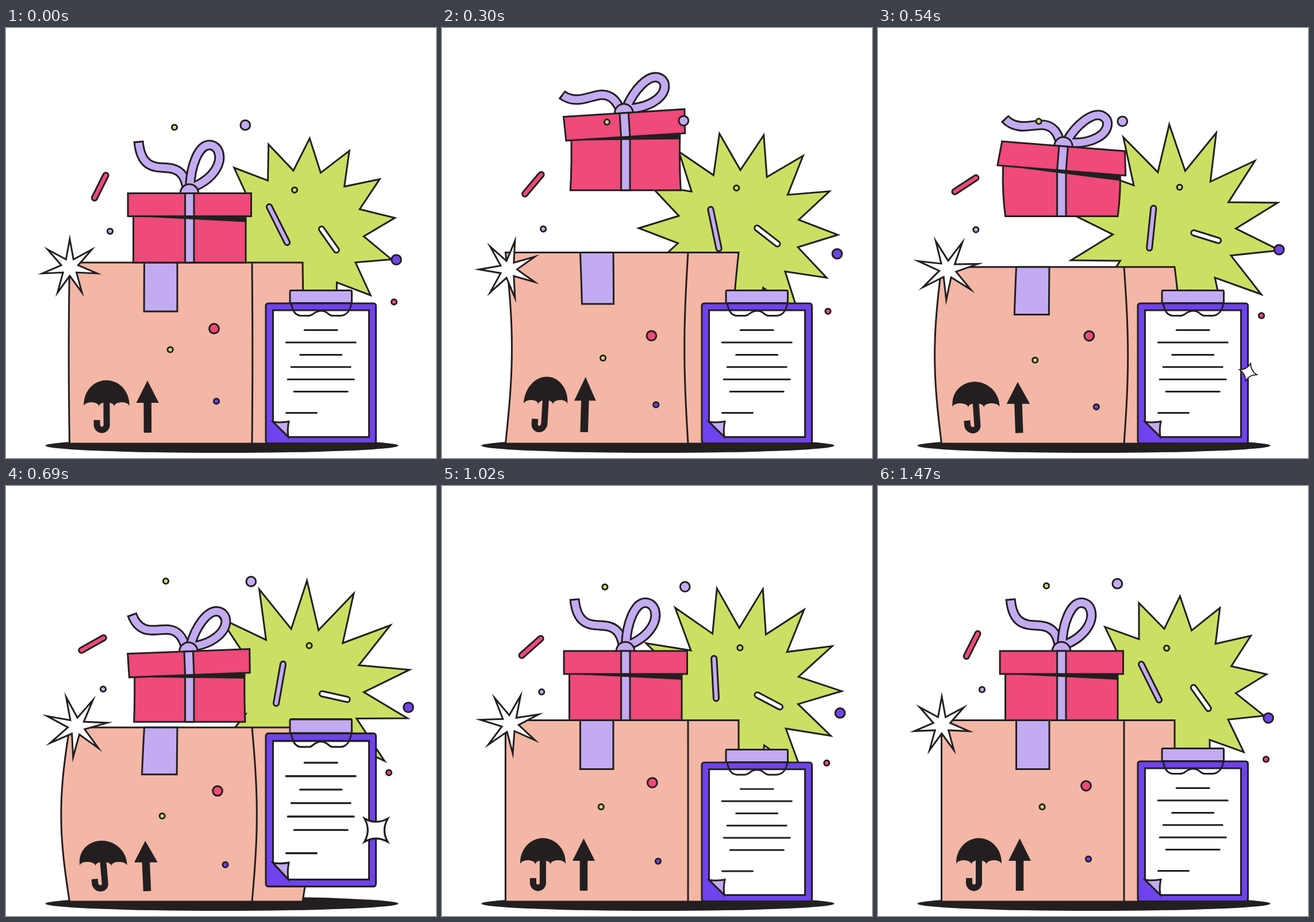
An HTML page with a canvas for the animation above (1500 ms loop, 748 px wide and 748 px high).

```html
<!DOCTYPE html>
<html lang="en">
<head>
<meta charset="utf-8">
<title>Parcel and gift</title>
<style>
  html, body { margin: 0; width: 100%; height: 100%; overflow: hidden; background: #fff; }
  canvas { display: block; width: 100vw; height: 100vh; }
</style>
</head>
<body>
<canvas id="stage" width="748" height="748"></canvas>
<script>
const ctx = document.getElementById('stage').getContext('2d');
const INK = '#231f20', PINK = '#ef4a79', LILAC = '#c3abf2', PEACH = '#f4b7a6';
const LIME = '#cae063', PURPLE = '#6f43ee', WHITE = '#fff';
const LOOP = 1500, TAU = Math.PI * 2, RAD = Math.PI / 180, GRAVITY = .0065;

// Eased swell that peaks at 690 ms and is back at the end of the loop
const pulse = t => (1 - Math.cos(Math.PI * (t < 690 ? t / 690 : (LOOP - t) / 810))) / 2;
const wave = (t, delay) => Math.sin(TAU * (t - delay) / LOOP);
const fall = (t, apex) => GRAVITY * (t - apex) ** 2;

// Damped spring of the box lid; positive is squashed
const boxSink = t => 44 * Math.max(0, 1 - t / 1080) * Math.sin(TAU * t / 510);

function boardScale(t) {
  const u = (t - 540) / 510;
  return u < 0 || u > 1 ? 1 : 1 - .15 * Math.sin(Math.PI * u) * Math.sin(TAU * (t - 540) / 235);
}

function paint(fill, width = 3) {
  if (fill) { ctx.fillStyle = fill; ctx.fill(); }
  if (width) { ctx.lineWidth = width; ctx.strokeStyle = INK; ctx.stroke(); }
}
function poly(points, fill, width, open) {
  ctx.beginPath();
  points.forEach(([x, y]) => ctx.lineTo(x, y));
  if (!open) ctx.closePath();
  paint(fill, width);
}
function box(x, y, w, h, fill, radius = 0) {
  ctx.beginPath();
  ctx.roundRect(x, y, w, h, radius);
  paint(fill);
}
function disc(x, y, r, fill) {
  ctx.beginPath();
  ctx.arc(x, y, r, 0, TAU);
  paint(fill);
}
function star(cx, cy, count, outer, inner, degrees, fill) {
  poly(Array.from({ length: count * 2 }, (_, i) => {
    const a = degrees * RAD + i * Math.PI / count, r = i % 2 ? inner : outer;
    return [cx + r * Math.cos(a), cy + r * Math.sin(a)];
  }), fill);
}
const ring = (x, y, rx, ry, from, to) => Array.from({ length: 25 }, (_, i) => {
  const a = (from + (to - from) * i / 24) * RAD;
  return [x + rx * Math.cos(a), y + ry * Math.sin(a)];
});

// x, y, drift, sway, radius, colour; each dot sways a little later than the one before
const dots = [
  [181, 354, -12, -4.5, 4.6, LILAC],
  [416.3, 168.5, 10, -7.7, 8.4, LILAC],
  [362, 525.3, 6, 11.6, 8.4, PINK],
  [293, 170, -15, -8, 4.6, LIME],
  [285.7, 565.5, -14, 12.5, 4.6, LIME],
  [502, 280, 25.5, -3, 4.6, LIME],
  [675, 486.5, -9, 14, 4.6, PINK],
  [366, 653.7, 15.5, 5.5, 4.6, PURPLE],
  [679, 394.5, 21, -9.7, 8.4, PURPLE]
];
function drawDots(t) {
  dots.forEach(([x, y, drift, sway, r, fill], i) =>
    disc(x + drift * pulse(t), y + sway * wave(t, 35 * i - 20), r, fill));
}

function drawBar(t, x, y, drift, sway, length, angle, turn, fill) {
  ctx.save();
  ctx.translate(x + drift * pulse(t), y + sway * wave(t, 0));
  ctx.rotate((angle + turn * pulse(t)) * RAD);
  box(-length / 2 - 4.6, -4.6, length + 9.2, 9.2, fill, 4.6);
  ctx.restore();
}

function drawBox(t) {
  const sink = boxSink(t), top = 407.5 + sink;
  const bulge = sink > 0 ? .13 * sink / (sink + 10) : .0032 * sink;
  const warp = ([x, y]) => [
    313 + (x - 313) * (1 + bulge * Math.sin(Math.PI * (y - 407.5) / 315.5)),
    723 - (723 - y) * (723 - top) / 315.5
  ];
  const side = (x, y0, y1) => Array.from({ length: 21 }, (_, i) => [x, y0 + (y1 - y0) * i / 20]);
  const panel = (x0, y0, x1, y1, fill) =>
    poly([...side(x0, y1, y0), ...side(x1, y0, y1)].map(warp), fill);

  panel(110.5, 407.5, 516, 723, PEACH);
  poly(side(428, 407.5, 723).map(warp), null, 3, true);
  panel(240.5, 407.5, 298, 492.5, LILAC);

  const scallops = [26.3, 0, -26.3].flatMap(dx => ring(175.5 + dx, 658, 13, 7, 0, -180));
  poly([...ring(175.5, 655, 39.5, 42.5, 180, 360), ...scallops].map(warp), INK, 0);
  poly([[175.5, 650], ...ring(167, 690, 8.5, 9, 0, 180), [158.5, 682]].map(warp), null, 11, true);
  poly([[246.5, 613], [266, 652], [227, 652]].map(warp), INK, 0);
  poly([[246.5, 651], [246.5, 704]].map(warp), null, 13.5, true);
}

// Cubic curves starting at the knot's frame: tail at rest, tail in the wind, loop of the bow
const tailRest = [-88.5, -91, -84, -35, -50, -48, -30, -43, -14, -39, -7, -28, -4, -8];
const tailBlown = [-108, -33, -82, -16, -56, -33, -38, -33, -20, -33, -12, -20, -6, -6];
const bowLoop = [1, -10, 2, -48, 16, -83, 34, -84, 52, -84, 58, -62, 46, -42, 36, -26, 20, -16, 4, -10];

function drawRibbon(c) {
  ctx.beginPath();
  ctx.moveTo(c[0], c[1]);
  for (let i = 2; i < c.length; i += 6) ctx.bezierCurveTo(...c.slice(i, i + 6));
  paint(null, 18);
  ctx.setLineDash([0, 3, 999, 0]);
  ctx.lineWidth = 12;
  ctx.strokeStyle = LILAC;
  ctx.stroke();
  ctx.setLineDash([]);
}
function drawBow(wind) {
  drawRibbon(tailRest.map((v, i) => v + (tailBlown[i] - v) * wind * wind));
  const cos = Math.cos(.4 * wind), sin = Math.sin(.4 * wind), flat = 1 - .12 * wind;
  drawRibbon(bowLoop.map((v, i, c) => i % 2
    ? (v * cos + c[i - 1] * sin) * flat
    : v * cos - c[i + 1] * sin));
  disc(0, 0, 15.8, LILAC);
}

function drawGift(t) {
  // Two hops, each a free flight above the springing box
  const [apex, top] = t < 640 ? [406.5, 210] : [790, 346.5];
  const ground = 407.5 + boxSink(t);
  const base = Math.min(ground, top + fall(t, apex));
  const gap = ground - base, flight = gap / (gap + 6);
  const tilt = .036 * (t - apex) * flight, bulge = tilt / 4;
  const cx = 319.3, lidY = base - 80.5 - gap * (.06 - .015 * tilt);
  const height = 40 + 2 * Math.abs(bulge);
  const low = 97.75 + 2 * Math.min(bulge, 0), mid = 97.75 + 5 * bulge, high = 97.75 + 3.5 * bulge;

  ctx.beginPath();
  ctx.moveTo(cx - low, base);
  ctx.quadraticCurveTo(cx - mid, (base + lidY) / 2, cx - high, lidY - 9);
  ctx.lineTo(cx + high, lidY - 9);
  ctx.quadraticCurveTo(cx + mid, (base + lidY) / 2, cx + low, base);
  ctx.closePath();
  paint(PINK);
  box(cx - 7.7, lidY - 9, 15.4, base - lidY + 9, LILAC);

  ctx.save();
  ctx.translate(cx, lidY);
  ctx.rotate(tilt * RAD);
  poly([[-90, 0], [high, 0], [high, 9.5]], INK, 1);

  ctx.save();
  ctx.translate(-.3, -height);
  drawBow(flight);
  ctx.restore();

  const wide = 107.2 + 2 * Math.min(bulge, 0), narrow = 107.2 + 4 * bulge;
  poly([[-wide, -height], [wide, -height], [narrow, 0], [-narrow, 0]], PINK);
  box(-7.7, -height, 15.4, height, LILAC);
  ctx.restore();
}

function drawClipboard(t) {
  ctx.save();
  ctx.translate(0, 722 - Math.max(0, 50 - fall(t, 752)));
  ctx.scale(1, boardScale(t));
  ctx.translate(0, -722);

  box(452, 479, 191.5, 243.5, PURPLE, 4);
  poly([[464.5, 491], [631.5, 491], [631.5, 711.5], [491, 711.5], [464.5, 685]], WHITE);
  const fold = new Path2D('M464.5 685Q478 687 492 684.5Q489 698 491 711Z');
  ctx.fillStyle = LILAC;
  ctx.fill(fold);
  ctx.stroke(fold);

  ctx.lineCap = 'round';
  const rule = (x, y, width) => poly([[x, y], [x + width, y]], null, 3, true);
  [57, 121, 72, 103, 115, 93].forEach((w, i) => rule(547.7 - w / 2, 525.6 + 21.4 * i, w));
  rule(487.5, 669.5, 53);
  ctx.lineCap = 'butt';

  box(494, 456.5, 107.5, 22, LILAC, 2);
  ctx.stroke(new Path2D('M496 478C498 492 504 500 513 500.5H527C535 500 536 492 548 492S560 500 568 500.5H582C592 500 599 492 601 478'));
  ctx.restore();
}

function drawTwinkle(t) {
  const size = Math.sin(Math.PI * (t - 460) / 440);
  if (t < 460 || t > 900) return;
  ctx.save();
  ctx.translate(643.8, 598.7);
  ctx.rotate((45 + (t - 690) * .193) * RAD);
  ctx.scale(size, size);
  ctx.beginPath();
  ctx.moveTo(28.5, 0);
  for (let a = 0; a < 360; a += 90) {
    const waist = (a + 45) * RAD, tip = (a + 90) * RAD;
    ctx.quadraticCurveTo(9 * Math.cos(waist), 9 * Math.sin(waist), 28.5 * Math.cos(tip), 28.5 * Math.sin(tip));
  }
  ctx.closePath();
  paint(WHITE, 3.3);
  ctx.restore();
}

function draw(t) {
  const p = pulse(t);
  ctx.fillStyle = WHITE;
  ctx.fillRect(0, 0, 748, 748);

  ctx.beginPath();
  ctx.ellipse(375.5, 726.5, 307, 12.5, 0, 0, TAU);
  paint(INK, 0);

  star(515.5, 354, 14, 162.5 + 27 * p, 107, -8.4 + t / LOOP * 360 / 7, LIME);
  drawBar(t, 163.7, 276, -13.2, -4.4, 44, -63.4, 34, PINK);
  drawBar(t, 473.5, 342, 2.5, 8, 69.3, 63.4, 36.6, LILAC);
  drawBar(t, 561.8, 368, 10, -6.5, 44.6, 54.7, -42, WHITE);

  drawBox(t);
  drawGift(t);
  drawClipboard(t);
  star(110.9 + 11.7 * p, 416.6 + 3.7 * wave(t, 40), 7, 49 + 5 * p, 15, -90 + 32 * p, WHITE);
  drawTwinkle(t);
  drawDots(t);
}

function frame() {
  draw(performance.now() % LOOP);
  requestAnimationFrame(frame);
}
frame();
</script>
</body>
</html>
```
